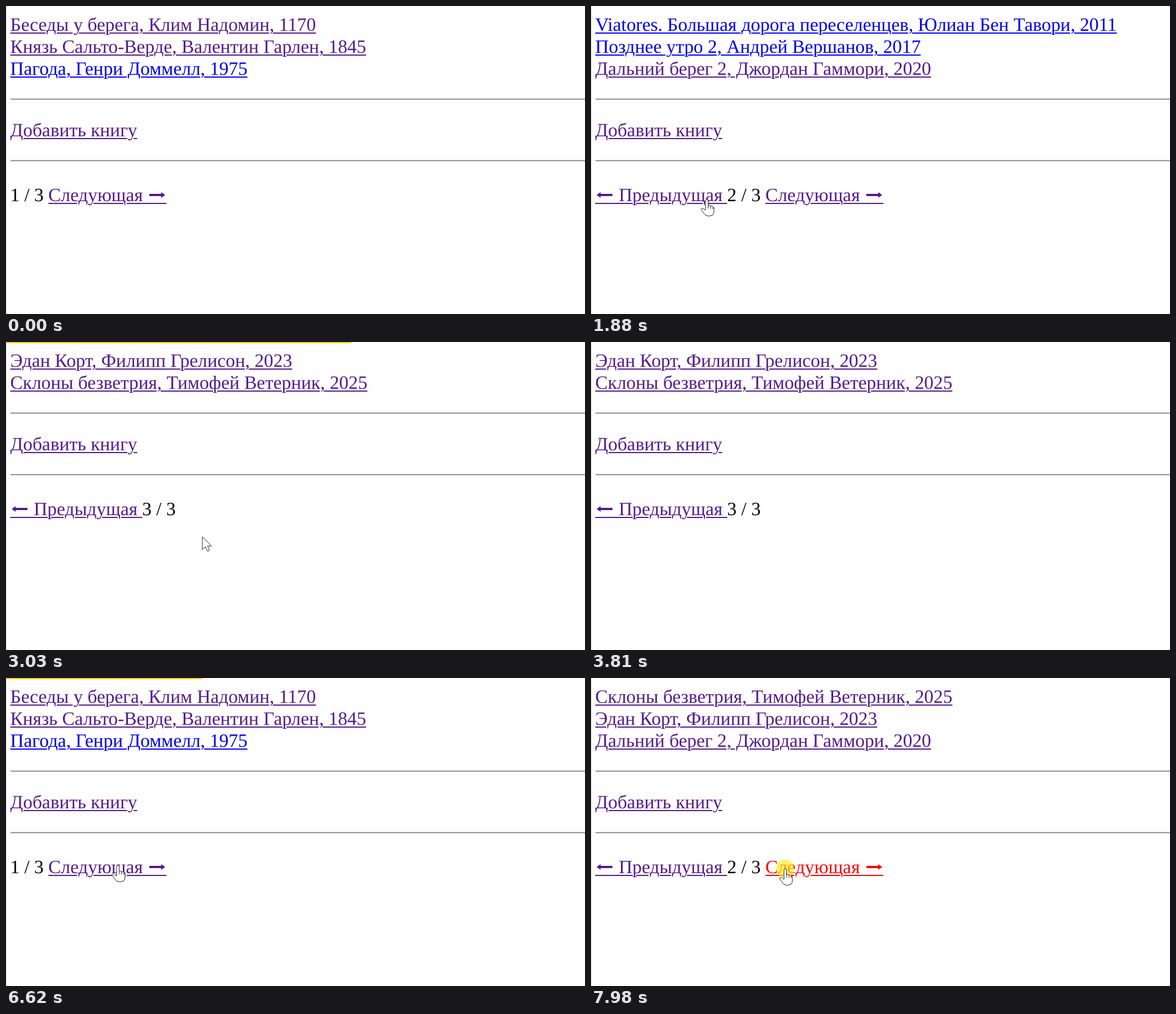
An HTML page that plays this animation: 1026 px wide and 546 px high, repeating every 8 s.

```html
<!DOCTYPE html>
<html lang="ru">
<head>
<meta charset="utf-8">
<title>Список книг</title>
<style>
  html, body { margin: 0; width: 100%; height: 100%; overflow: hidden; background: #fefefe; }
  #stage { position: relative; width: 1026px; height: 546px; overflow: hidden; box-sizing: border-box;
    border-left: 1px solid #dcdcdc; font: 33.33px/39px "Liberation Serif", serif;
    text-rendering: geometricPrecision; color: #000; }
  .line { position: absolute; left: 6.5px; white-space: pre; }
  .rule { position: absolute; left: 7px; width: 1100px; border-top: 2px solid #9a9a9a;
    height: 1px; background: #e8e8e8; }
  a { color: #551a8b; text-decoration: underline 2px; text-underline-offset: 3px; }
  a.fresh { color: #00e; }
  .pressed a.next { color: #f00; }
  .arrow { position: relative; }
  .arrow svg { position: absolute; left: 0; top: 10px; width: 33px; height: 16px; fill: currentColor; }
  .prev svg { transform: scaleX(-1); }
  #bar { position: absolute; left: 0; top: 0; height: 2px; background: #fc0; }
  #pointer { position: absolute; left: -1px; top: 0; }
</style>
</head>
<body>
<div id="stage">
  <div id="page"></div>
  <div id="bar"></div>
  <svg id="pointer" width="1026" height="546">
    <circle id="halo" r="16" fill="#ffec1c" fill-opacity=".68"/>
    <path id="cursor" fill="#fff" stroke="#222" stroke-linejoin="round"/>
  </svg>
</div>
<script>
const LOOP = 8000;
const $ = id => document.getElementById(id);

const book = (text, fresh) => ({ text, fresh });
const slopes = book('Склоны безветрия, Тимофей Ветерник, 2025');
const portrait = book('Эдан Корт, Филипп Грелисон, 2023');
const shore = book('Дальний берег 2, Джордан Гаммори, 2020');
const first = { number: 1, books: [
  book('Беседы у берега, Клим Надомин, 1170'),
  book('Князь Сальто-Верде, Валентин Гарлен, 1845'),
  book('Пагода, Генри Доммелл, 1975', true)] };
const second = { number: 2, books: [
  book('Viatores. Большая дорога переселенцев, Юлиан Бен Тавори, 2011', true),
  book('Позднее утро 2, Андрей Вершанов, 2017', true),
  shore] };
const third = { number: 3, books: [portrait, slopes] };
const resorted = { number: 2, books: [slopes, portrait, shore] };

const pages = [[0, first], [1570, second], [2965, third], [5170, first], [6650, resorted]];
const presses = [[1340, 1440], [2780, 2880], [6350, 6480], [7980, LOOP]];
const loads = [[1390, 1570], [2850, 2965], [6470, 6650]];  // request start, response

// Pointer trips: start time, x, y, end time, x, y, easing
const linear = p => p;
const easeOut = p => 1 - (1 - p) ** 1.7;
const smooth = p => p * p * (3 - 2 * p);
const trips = [
  [150, 763, 517, 290, 494, 450, easeOut],
  [460, 494, 450, 1070, 205, 343, easeOut],
  [1890, 205, 343, 2130, 305, 356, smooth],
  [2150, 305, 356, 2450, 348, 345, easeOut],
  [3400, 348, 345, 3550, 390, 344, p => p * p],
  [3550, 390, 344, 3780, 834, 283, linear],
  [5420, 869, 392, 6110, 198, 332, easeOut],
  [7180, 198, 332, 7780, 344, 338, smooth],
];
const away = t => t < 150 || (t >= 3810 && t < 5420);

const shapes = {
  arrow: 'M0 0V23L5.3 18 9 26 12.6 24.4 9.2 16.8H16Z',
  hand: 'M-2 19V2Q-2 0 .3 0T2.6 2V11Q3 9.5 5 10T7 12Q8 11 9.5 11.5T11 13.5Q13 13 13 16V20Q13 26 10 28' +
    'Q3 31-2 28Q-4 26-9 19Q-11 16-8.5 15.5Q-6 15.5-2 19ZM2.6 11v5M7 12v4.5M11 13.5v3.5',
  beam: 'M-4-13H4M0-13V13M-4 13H4',
};

const line = (top, html) => `<div class="line" style="top:${top}px">${html}</div>`;
const rule = top => `<div class="rule" style="top:${top}px"></div>`;
const arrow = '<span class="arrow">&nbsp;&nbsp;&nbsp;&nbsp;' +
  '<svg viewBox="0 0 33 16"><path d="M3 6H24V3L31 8 24 13V10H3Z"/></svg></span>';

function pageHtml({ number, books }) {
  const shift = (books.length - 3) * 39;
  const prev = number > 1 ? `<a class="prev">${arrow} Предыдущая </a>` : '';
  const next = number < 3 ? ` <a class="next">Следующая ${arrow}</a>` : '';
  return books.map((b, i) => line(14 + i * 39, `<a class="${b.fresh ? 'fresh' : ''}">${b.text}</a>`)).join('') +
    rule(164 + shift) + line(201 + shift, '<a>Добавить книгу</a>') +
    rule(273 + shift) + line(316 + shift, `${prev}${number} / 3${next}`);
}

function pointerAt(t) {
  const [t0, x0, y0, t1, x1, y1, ease] = trips.filter(trip => trip[0] <= t).pop();
  const p = ease(Math.min(1, (t - t0) / (t1 - t0)));
  return [x0 + (x1 - x0) * p, y0 + (y1 - y0) * p];
}

function cursorKind(page, x, y) {
  if (page.number === 3 || y < 317 || y > 355) return 'arrow';
  if (page.number === 1) return x > 75 && x < 284 ? 'hand' : 'arrow';
  return x > 517 ? 'arrow' : x > 241 && x < 308 ? 'beam' : 'hand';
}

function barWidth(t) {
  const load = loads.find(([start, done]) => t >= start && t < done + 300);
  if (!load) return 0;
  const [start, done] = load;
  return t < done ? 346 * easeOut(Math.min(1, (t - start) / 100))
    : 346 + 770 * easeOut((t - done) / 300);
}

let shown;
function draw() {
  const t = performance.now() % LOOP;
  const page = pages.filter(([start]) => start <= t).pop()[1];
  if (page !== shown) $('page').innerHTML = pageHtml(shown = page);

  const pressed = presses.some(([down, up]) => t >= down && t < up);
  $('page').className = pressed ? 'pressed' : '';
  $('bar').style.width = barWidth(t) + 'px';

  $('pointer').style.display = away(t) ? 'none' : '';
  if (!away(t)) {
    const [x, y] = pointerAt(t);
    const place = `translate(${x.toFixed(1)} ${y.toFixed(1)})`;
    $('cursor').setAttribute('d', shapes[cursorKind(page, x, y)]);
    $('cursor').setAttribute('transform', place);
    $('halo').setAttribute('transform', place);
    $('halo').style.display = pressed ? '' : 'none';
  }
  requestAnimationFrame(draw);
}
draw();
</script>
</body>
</html>
```
